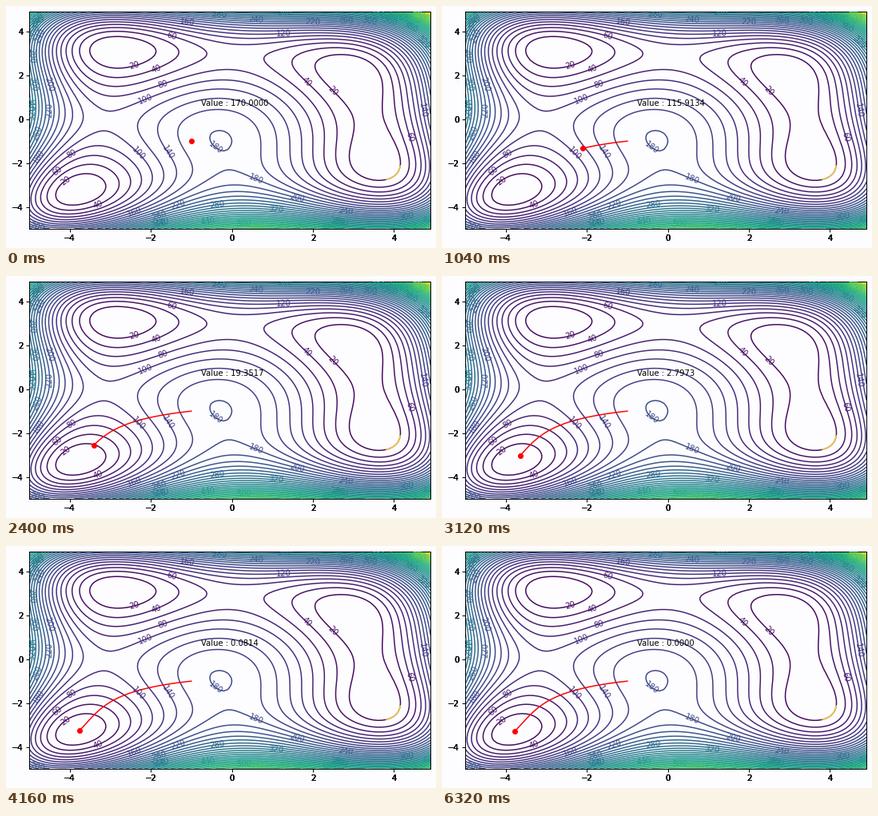
A matplotlib script for the animation above (8 s loop, 538 px wide and 303 px high).

```python
import numpy as np
import matplotlib.pyplot as plt
from matplotlib.animation import FuncAnimation

WIDTH, HEIGHT, DPI = 538, 303, 72
FRAMES, INTERVAL = 200, 40
RATE = 0.001
PAPER = "#fdfdff"

plt.rcParams["font.family"] = "DejaVu Sans"
plt.rcParams["font.size"] = 10


def himmelblau(x, y):
    return (x**2 + y - 11) ** 2 + (x + y**2 - 7) ** 2


def gradient(x, y):
    a, b = x**2 + y - 11, x + y**2 - 7
    return np.array([4 * x * a + 2 * b, 2 * a + 4 * y * b])


def descend(start, steps):
    path = [np.array(start, float)]
    for _ in range(steps):
        path.append(path[-1] - RATE * gradient(*path[-1]))
    return np.array(path)


def tick_label(ax, value, axis):
    """Tick text stacked on itself, which hardens its antialiased edges."""
    if axis == "x":
        spot, shift, trans = (value, 0), (0, -7), ax.get_xaxis_transform()
        align = dict(ha="center", va="top")
    else:
        spot, shift, trans = (0, value), (-7, 0), ax.get_yaxis_transform()
        align = dict(ha="right", va="center_baseline")
    for _ in range(5):
        ax.annotate(str(value).replace("-", "\u2212"), spot, shift,
                    xycoords=trans, textcoords="offset points", **align)


# The tiny margin keeps the pixel size from rounding down.
fig = plt.figure(figsize=((WIDTH + 1e-9) / DPI, (HEIGHT + 1e-9) / DPI),
                 dpi=DPI, facecolor=PAPER)
ax = fig.add_axes([28.9 / WIDTH, 24 / HEIGHT, 502.2 / WIDTH, 271.8 / HEIGHT],
                  facecolor=PAPER)

grid = np.arange(-5, 5, 0.1)
X, Y = np.meshgrid(grid, grid)
Z = himmelblau(X, Y)
ax.set_xlim(grid[0], grid[-1])
ax.set_ylim(grid[0], grid[-1])

contours = ax.contour(X, Y, Z, levels=np.arange(0, 821, 20), cmap="viridis")
ax.clabel(contours, inline=False, fontsize=10, fmt="%d")
# Highlighted stretch of the lowest ring, lower right
part = np.s_[21:30, 88:93]
ax.contour(X[part], Y[part], Z[part], levels=[20], colors="#ffd34a")
ax.set_xlim(grid[0], grid[-1])
ax.set_ylim(grid[0], grid[-1])

ticks = range(-4, 5, 2)
ax.set_xticks(ticks, [])
ax.set_yticks(ticks, [])
ax.tick_params(length=4, width=1)
for spine in ax.spines.values():
    spine.set_linewidth(1)
for tick in ticks:
    tick_label(ax, tick, "x")
    tick_label(ax, tick, "y")

path = descend((-1, -1), FRAMES)
trail, = ax.plot([], [], color="red", lw=1.5)
ball, = ax.plot([], [], "o", color="red", ms=6)
readout = ax.text(-0.75, 0.6, "")


def update(i):
    trail.set_data(path[:i + 1, 0], path[:i + 1, 1])
    ball.set_data(path[i:i + 1, 0], path[i:i + 1, 1])
    readout.set_text(f"Value : {himmelblau(*path[i]):.4f}")
    return trail, ball, readout


def reset():
    return update(0)


anim = FuncAnimation(fig, update, frames=FRAMES, init_func=reset,
                     interval=INTERVAL, repeat=True, repeat_delay=0)
plt.show()
```
